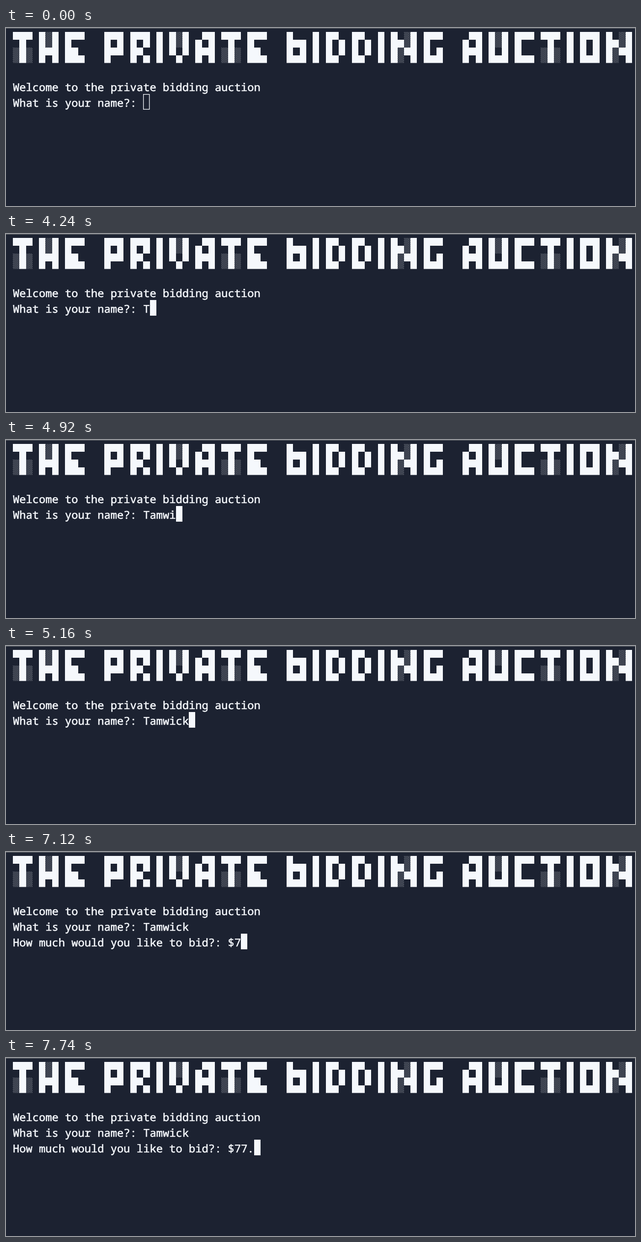
Animation, 1280 px wide and 364 px high, one loop 8 s. Source, as an HTML page:

```html
<!DOCTYPE html>
<html lang="en">
<head>
<meta charset="utf-8">
<title>Private bidding auction</title>
<style>
  html, body { margin: 0; width: 100%; height: 100%; overflow: hidden; background: #1c2231; }
  svg { display: block; width: 1280px; height: 364px; }
  text {
    font: 500 22.105px "Noto Sans Mono", "DejaVu Sans Mono", monospace;
    fill: #f5f8fc; stroke: #f5f8fc; stroke-width: 0.6px;
    white-space: pre; text-rendering: geometricPrecision;
    font-variant-ligatures: none;
  }
</style>
</head>
<body>
<svg id="stage" viewBox="0 0 1280 364" xmlns="http://www.w3.org/2000/svg">
  <defs>
    <pattern id="shade" x="14" y="8" width="3.316" height="3.97" patternUnits="userSpaceOnUse">
      <path d="M0.3 0.5h1.05v1.05h-1.05zM1.96 2.48h1.05v1.05h-1.05z" fill="#f5f8fc"/>
    </pattern>
  </defs>
  <rect width="1280" height="364" fill="#1c2231"/>
  <rect width="1280" height="1" fill="#686b70"/>
</svg>
<script>
const LOOP = 8000, LEFT = 14, TOP = 8, CELL = 13.263, ROW = 31.75, INK = '#f5f8fc';
const stage = document.getElementById('stage');

const BANNER = [
  '▀█▀ █░█ █▀▀   █▀█ █▀█ █ █░█ ▄▀█ ▀█▀ █▀▀   █▄▄ █ █▀▄ █▀▄ █ █▄░█ █▀▀   ▄▀█ █░█ █▀▀ ▀█▀ █ █▀█ █▄░█',
  '░█░ █▀█ ██▄   █▀▀ █▀▄ █ ▀▄▀ █▀█ ░█░ ██▄   █▄█ █ █▄▀ █▄▀ █ █░▀█ █▄█   █▀█ █▄█ █▄▄ ░█░ █ █▄█ █░▀█'
];
// Vertical extent of each block glyph within its cell
const SPAN = { '█': [0, 1], '░': [0, 1], '▀': [0, 0.5], '▄': [0.5, 1] };

const colX = c => LEFT + c * CELL;
const rowY = r => TOP + r * ROW;

function add(tag, attrs) {
  const el = document.createElementNS('http://www.w3.org/2000/svg', tag);
  for (const k in attrs) el.setAttribute(k, attrs[k]);
  return stage.appendChild(el);
}

// A cell outline; edges are snapped to whole pixels except the lower one of the banner
function cellPath(col, top, bottom) {
  const x = Math.round(colX(col)), right = Math.round(colX(col + 1));
  return `M${x} ${Math.round(rowY(top))}H${right}V${bottom === 2 ? rowY(2) : Math.round(rowY(bottom))}H${x}Z`;
}

function drawBanner() {
  let solid = '', shaded = '';
  BANNER.forEach((line, row) => [...line].forEach((ch, col) => {
    if (!SPAN[ch]) return;
    const [a, b] = SPAN[ch];
    const d = cellPath(col, row + a, row + b);
    if (ch === '░') shaded += d; else solid += d;
  }));
  add('path', { d: shaded, fill: 'url(#shade)' });
  add('path', { d: solid, fill: INK });
}

const textLine = row => add('text', { x: LEFT, y: rowY(row) + 26 });

drawBanner();
textLine(3).textContent = 'Welcome to the private bidding auction';
const lines = [textLine(4), textLine(5)];
const cursor = add('path', { fill: INK });
const frame = add('rect', {
  x: colX(20) + 0.4, y: rowY(4) + 0.7, width: CELL - 1.1, height: 30.6,
  fill: 'none', stroke: INK, 'stroke-width': 1.3
});

const ASK_NAME = 'What is your name?: ', ASK_BID = 'How much would you like to bid?: $';
const NAME = 'Tamwick', BID = '77.';
const NAME_KEYS = [4240, 4580, 4650, 4730, 4920, 5100, 5160];
const BID_KEYS = [7120, 7270, 7740];
const FOCUS = 550, ENTER = 5910;

const typed = (text, keys, t) => text.slice(0, keys.filter(k => k <= t).length);

let shown = '';
function render(t) {
  const first = ASK_NAME + typed(NAME, NAME_KEYS, t);
  const second = t >= ENTER ? ASK_BID + typed(BID, BID_KEYS, t) : '';
  const focused = t >= FOCUS;
  const key = first + second + focused;
  if (key === shown) return;
  shown = key;

  lines[0].textContent = first;
  lines[1].textContent = second;
  const row = second ? 5 : 4;
  cursor.setAttribute('d', cellPath((second || first).length, row, row + 1));
  cursor.style.display = focused ? '' : 'none';
  frame.style.display = focused ? 'none' : '';
}

const start = performance.now();
function tick() {
  render((performance.now() - start) % LOOP);
  requestAnimationFrame(tick);
}
tick();
</script>
</body>
</html>
```
